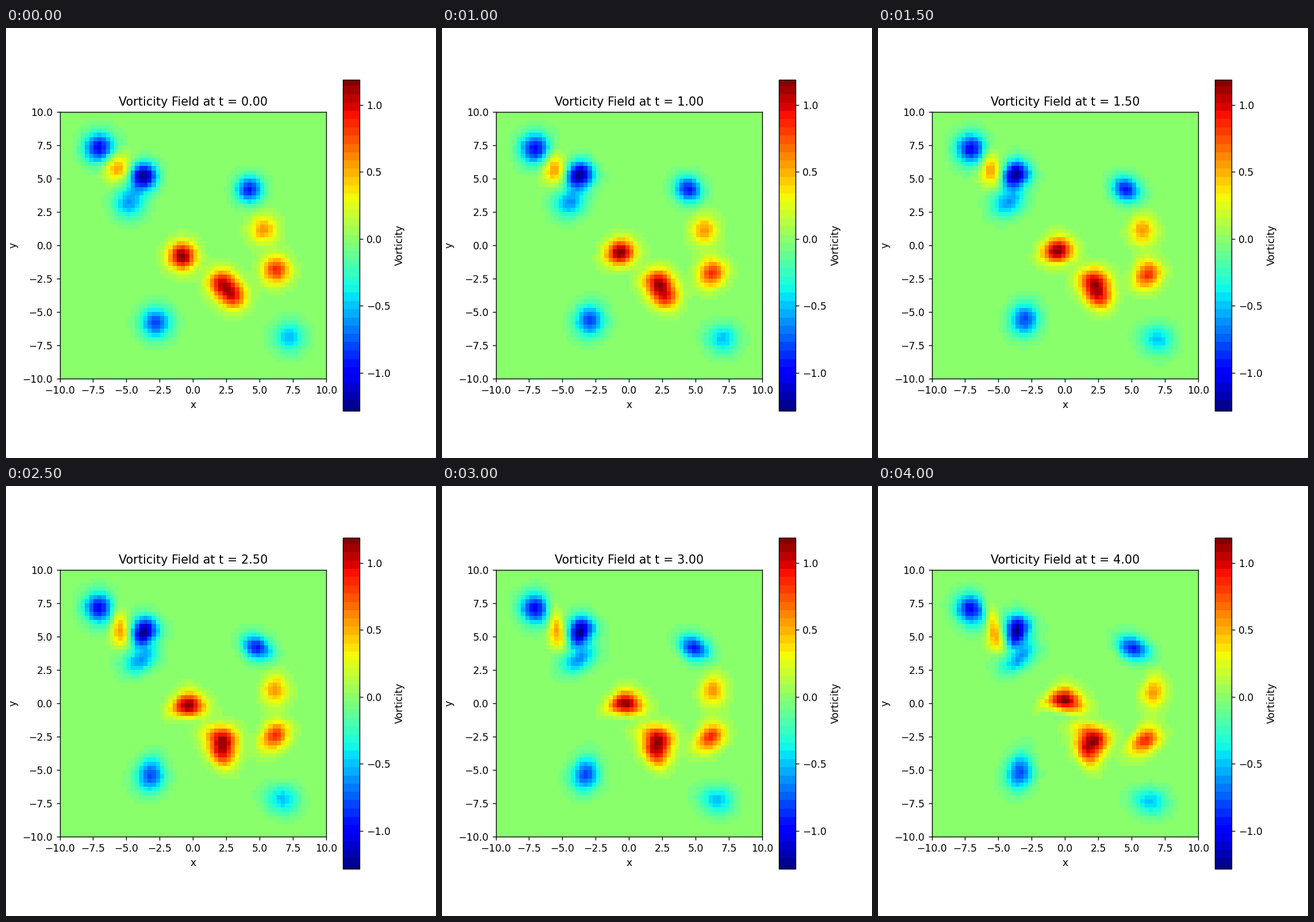
A matplotlib script that plays this animation: 748 px wide and 748 px high, repeating every 4500 ms.

```python
import numpy as np
import matplotlib.pyplot as plt
from matplotlib.animation import FuncAnimation
from matplotlib.colors import ListedColormap

N, L = 64, 20.0
DX = L / N
DT = 0.02
FRAMES, FRAME_TIME = 9, 0.5
LOW, HIGH = -1.283, 1.19
BANDS = 40

# Gaussian width: vortices as (x, y, strength)
VORTICES = {
    0.72: [(-5.7, 5.85, 0.6), (-3.75, 5.2, -1.28), (4.2, 4.2, -0.92),
           (5.25, 1.2, 0.56), (6.2, -1.85, 0.86), (-0.85, -0.8, 1.2),
           (2.1, -2.8, 0.92), (3.0, -3.8, 0.85)],
    0.82: [(-7.05, 7.3, -1.0), (-4.8, 3.2, -0.6), (-2.8, -5.8, -0.8),
           (7.2, -6.85, -0.5)],
}

axis = -L / 2 + DX * (np.arange(N) + 0.5)
X, Y = np.meshgrid(axis, axis)
k = 2 * np.pi * np.fft.fftfreq(N, DX)
KX, KY = np.meshgrid(k, k)
K2 = KX**2 + KY**2
K2[0, 0] = 1.0


def initial_field():
    return sum(a * np.exp(-((X - x)**2 + (Y - y)**2) / (2 * width**2))
               for width, group in VORTICES.items() for x, y, a in group)


def slope(f, ax):
    return (np.roll(f, -1, ax) - np.roll(f, 1, ax)) / (2 * DX)


def rate(w):
    """Advection of the vorticity by its own periodic stream function."""
    psi_hat = -np.fft.fft2(w) / K2
    psi_hat[0, 0] = 0
    u = np.fft.ifft2(1j * KY * psi_hat).real
    v = -np.fft.ifft2(1j * KX * psi_hat).real
    return -(u * slope(w, 1) + v * slope(w, 0))


def simulate():
    w = initial_field()
    fields = [w]
    for _ in range(FRAMES - 1):
        for _ in range(round(FRAME_TIME / DT)):
            w = w + DT * rate(w + DT / 2 * rate(w))
        fields.append(w)
    return fields


def banded_jet():
    """Jet in even bands, with one band centred on zero vorticity."""
    zero = -LOW / (HIGH - LOW)
    ramp = np.linspace(0, 1, 1024)
    steps = np.round((ramp - zero) * BANDS) / BANDS
    return ListedColormap(plt.get_cmap("jet")(np.clip(zero + steps, 0, 1)))


fields = simulate()

fig, ax = plt.subplots(figsize=(6, 6), dpi=748 / 6)
image = ax.imshow(fields[0], origin="lower", extent=(-10, 10, -10, 10),
                  cmap=banded_jet(), vmin=LOW, vmax=HIGH,
                  interpolation="nearest")
fig.colorbar(image, ax=ax, label="Vorticity")
ax.set_xlabel("x")
ax.set_ylabel("y")
title = ax.set_title("Vorticity Field at t = 0.00")


def update(i):
    image.set_data(fields[i])
    title.set_text(f"Vorticity Field at t = {i * FRAME_TIME:.2f}")
    return image, title


anim = FuncAnimation(fig, update, frames=FRAMES, interval=500,
                     repeat=True, repeat_delay=0, blit=False)
plt.show()
```
